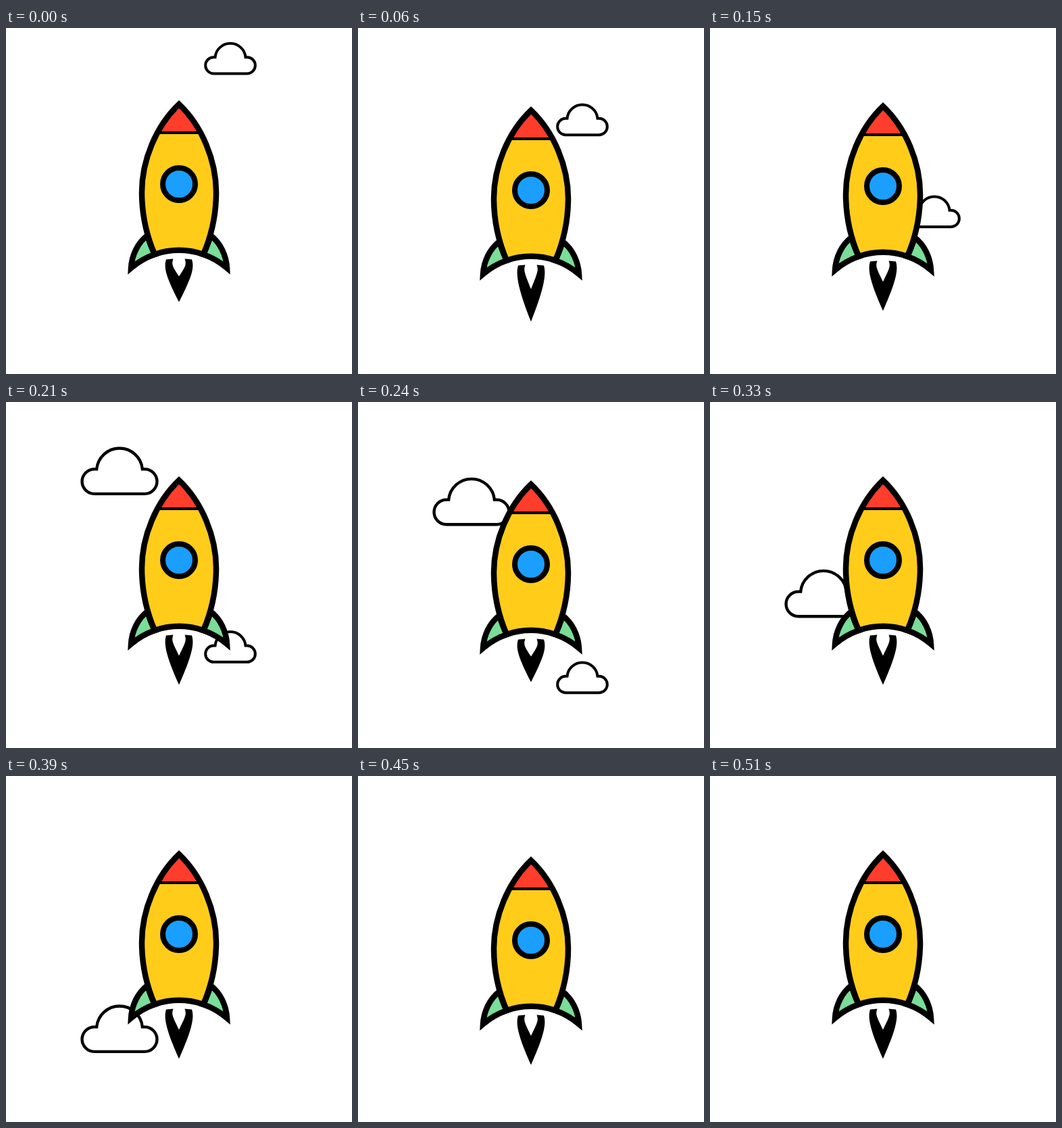
These frames come from a looping animation (512x512 px, 540 ms). An HTML page:

```html
<!DOCTYPE html>
<html lang="en">
<head>
<meta charset="utf-8">
<title>Rocket</title>
<style>
  html, body { margin: 0; width: 100%; height: 100%; overflow: hidden; background: #fff; }
  svg { display: block; width: 100%; height: 100%; }
  .line { stroke: #000; stroke-width: 8.5; stroke-miterlimit: 6; }
  .cloud { fill: #fff; stroke: #000; stroke-width: 4; }
  #big .cloud { stroke-width: 2.9; }
</style>
</head>
<body>
<svg viewBox="0 0 512 512">
  <defs>
    <path id="puff" d="M-24.7 44.5a12.15 12.15 0 0 1 0-24.3h2.2A22.6 22.6 0 0 1 22.5 20.2h2.2a12.15 12.15 0 0 1 0 24.3z"/>
    <path id="fin" class="line" fill="#7add98" d="M209 307C195 318 186 336 185 355.2A111 111 0 0 1 220 335C215 325 212 316 209 307z"/>
    <path id="hull" d="M256 112.9C222 145 201 196 201 243C201 275 207 305 220 335A111 111 0 0 1 292 335C305 305 311 275 311 243C311 196 290 145 256 112.9z"/>
    <clipPath id="inside"><use href="#hull"/></clipPath>
  </defs>
  <g id="small"><use class="cloud" href="#puff"/></g>
  <g id="big"><use class="cloud" href="#puff"/></g>
  <g id="rocket">
    <path id="flame"/>
    <use href="#fin"/>
    <use href="#fin" transform="matrix(-1 0 0 1 512 0)"/>
    <use href="#hull" fill="#ffcc1a"/>
    <g clip-path="url(#inside)">
      <path fill="#ff3d2b" d="M190 100h132v55H190z"/>
      <path stroke="#000" stroke-width="4" d="M190 155h132"/>
    </g>
    <use href="#hull" class="line" fill="none"/>
    <circle cx="256" cy="231" r="24" fill="#1a9fff" stroke="#000" stroke-width="8"/>
  </g>
</svg>
<script>
  const STEP = 30, STEPS = 18, FALL = 136 / 3;
  const $ = id => document.getElementById(id);
  const wave = (k, period, size) => size / 2 * (1 - Math.cos(2 * Math.PI * k / period));

  function placeCloud(id, k, first, last, x, y, scale) {
    const el = $(id);
    el.style.display = k >= first && k <= last ? '' : 'none';
    el.setAttribute('transform', `translate(${x} ${y + FALL * (k - first)}) scale(${scale})`);
  }

  function flamePath(len) {
    const tip = 405.5 + len, notch = 367.5 + len / 2, bend = 368 + len / 2;
    return `M237 342.5L247.5 341.5C244.5 350 246.5 353 256 ${notch}` +
      `C265.5 353 267.5 350 264.5 341.5L275 342.5` +
      `C279 355 275 ${bend} 256 ${tip}C237 ${bend} 233 355 237 342.5z`;
  }

  function draw(k) {
    placeCloud('small', k, 0, 9, 332, 23, 1);
    placeCloud('big', k, 6, 14, 168, 23.6, 1.505);
    $('rocket').setAttribute('transform', `translate(0 ${wave(k, 6, 12)})`);
    $('flame').setAttribute('d', flamePath(wave(k, 4, 20)));
  }

  const start = performance.now();
  function tick() {
    draw(Math.floor((performance.now() - start) / STEP) % STEPS);
    requestAnimationFrame(tick);
  }
  tick();
</script>
</body>
</html>
```
